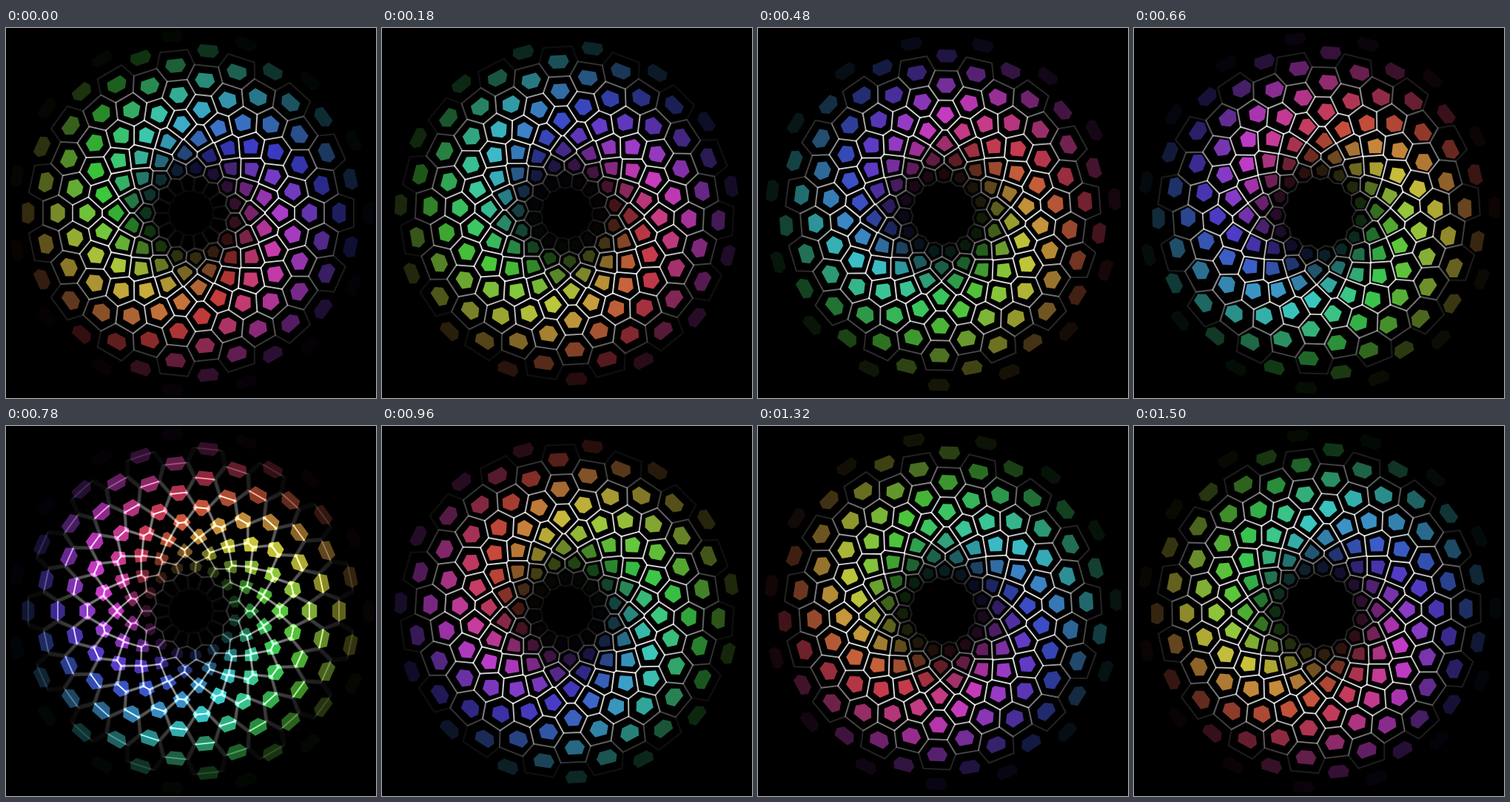
Recreate the animation shown at these times as an HTML page with a canvas. Size 500 by 500 pixels, loop 1.56 s.

```html
<!DOCTYPE html>
<html lang="en">
<head>
<meta charset="utf-8">
<title>Voronoi swirl</title>
<style>
html, body { margin: 0; height: 100%; overflow: hidden; background: #000; }
canvas { display: block; width: 500px; height: 500px; }
</style>
</head>
<body>
<canvas id="stage" width="500" height="500"></canvas>
<script>
const ctx = document.getElementById('stage').getContext('2d');
const LOOP = 1560, STEP = 60;
const GAP = 20, COUNT = 15, RAD = Math.PI / 180;
const PITCH = 360 / COUNT, HALF = PITCH / 2;
const SATURATION = 0.7;
const SAMPLES = 7, SHUTTER = 0.2, SHARPNESS = 10;

const polar = (r, deg) => [r * Math.cos(deg * RAD), r * Math.sin(deg * RAD)];
const bump = x => Math.sin(Math.PI / 2 * Math.max(0, Math.min(1, x)));

function fillLevel(r) {
  return 0.78 * (r < 122 ? bump((r - 40) / 82) ** 1.4 : bump((245 - r) / 123) ** 1.2);
}

function lineLevel(r) {
  return 0.9 * (r < 114 ? bump((r - 35) / 79) ** 1.4 : bump((214 - r) / 100));
}

function color(hue, value) {
  const light = value * (1 - SATURATION / 2);
  const sat = (value - light) / Math.min(light, 1 - light);
  return `hsl(${hue} ${sat * 100}% ${light * 100}%)`;
}

// Keep the part of the polygon that is nearer to site a than to site b.
function clip(poly, a, b) {
  const nx = b[0] - a[0], ny = b[1] - a[1];
  const mid = (nx * (a[0] + b[0]) + ny * (a[1] + b[1])) / 2;
  const side = p => nx * p[0] + ny * p[1] - mid;
  const out = [];
  poly.forEach((p, i) => {
    const q = poly[(i + 1) % poly.length];
    const sp = side(p), sq = side(q);
    if (sp <= 0) out.push(p);
    if (sp * sq < 0) {
      const t = sp / (sp - sq);
      out.push([p[0] + (q[0] - p[0]) * t, p[1] + (q[1] - p[1]) * t]);
    }
  });
  return out;
}

// Voronoi cell of a site at radius r, angle 0.
function cell(r) {
  const site = [r, 0];
  let poly = [[r - 60, -60], [r + 60, -60], [r + 60, 60], [r - 60, 60]];
  for (const [ring, deg] of [[0, PITCH], [1, HALF], [-1, HALF], [2, 0], [-2, 0]]) {
    const rr = r + ring * GAP;
    if (rr <= 0) continue;
    poly = clip(poly, site, polar(rr, deg));
    if (deg) poly = clip(poly, site, polar(rr, -deg));
  }
  return poly;
}

function rings(p) {
  const list = [];
  for (let k = -1; k <= 12; k++) {
    const r = GAP * (k + 2 * p);
    if (r > 22 && r < 250) list.push({ r, turn: HALF * (k & 1) + PITCH * p, poly: cell(r) });
  }
  return list;
}

function drawFills(list, p) {
  for (const { r, turn, poly } of list) {
    const value = fillLevel(r);
    if (value <= 0) continue;
    // Fills shrink outwards, faster along the radius than across it.
    const along = 0.62 - 4.2e-6 * r * r, across = 0.65 - 5e-4 * r;
    for (let j = 0; j < COUNT; j++) {
      const deg = turn + j * PITCH;
      ctx.save();
      ctx.rotate(deg * RAD);
      ctx.beginPath();
      for (const [x, y] of poly) ctx.lineTo(r + (x - r) * along, y * across);
      ctx.fillStyle = color(240 + deg + (200 - r) * 0.6 + 360 * p, value);
      ctx.fill();
      ctx.restore();
    }
  }
}

function drawLines(list, shift) {
  for (const { r, turn, poly } of list) {
    const level = lineLevel(r) * 100;
    if (level <= 0) continue;
    ctx.strokeStyle = `rgb(${level}% ${level}% ${level}%)`;
    for (let j = 0; j < COUNT; j++) {
      ctx.save();
      ctx.rotate((turn + shift + j * PITCH) * RAD);
      ctx.beginPath();
      for (const [x, y] of poly) ctx.lineTo(x, y);
      ctx.closePath();
      ctx.stroke();
      ctx.restore();
    }
  }
}

function ease(p) {
  return p < 0.5 ? (2 * p) ** SHARPNESS / 2 : 1 - (2 - 2 * p) ** SHARPNESS / 2;
}

function draw(p) {
  ctx.setTransform(1, 0, 0, 1, 0, 0);
  ctx.globalCompositeOperation = 'source-over';
  ctx.globalAlpha = 1;
  ctx.fillStyle = '#000';
  ctx.fillRect(0, 0, 500, 500);
  ctx.translate(250, 250);
  const list = rings(p);
  drawFills(list, p);

  // The net slips round by one pitch; samples add up to motion blur.
  // Every edge is shared by two cells, hence the factor 2.
  ctx.globalCompositeOperation = 'lighter';
  ctx.globalAlpha = 1 / (2 * SAMPLES);
  ctx.lineWidth = 1.8;
  ctx.lineJoin = 'round';
  for (let i = 0; i < SAMPLES; i++) {
    const offset = ((i + 0.5) / SAMPLES - 0.5) * SHUTTER * STEP / LOOP;
    drawLines(list, -PITCH * ease(Math.max(0, Math.min(1, p + offset))));
  }
}

const start = performance.now();
let last = -1;
function tick(now) {
  const step = Math.floor(Math.max(0, now - start) % LOOP / STEP);
  if (step !== last) draw(step * STEP / LOOP);
  last = step;
  requestAnimationFrame(tick);
}
draw(0);
requestAnimationFrame(tick);
</script>
</body>
</html>
```
